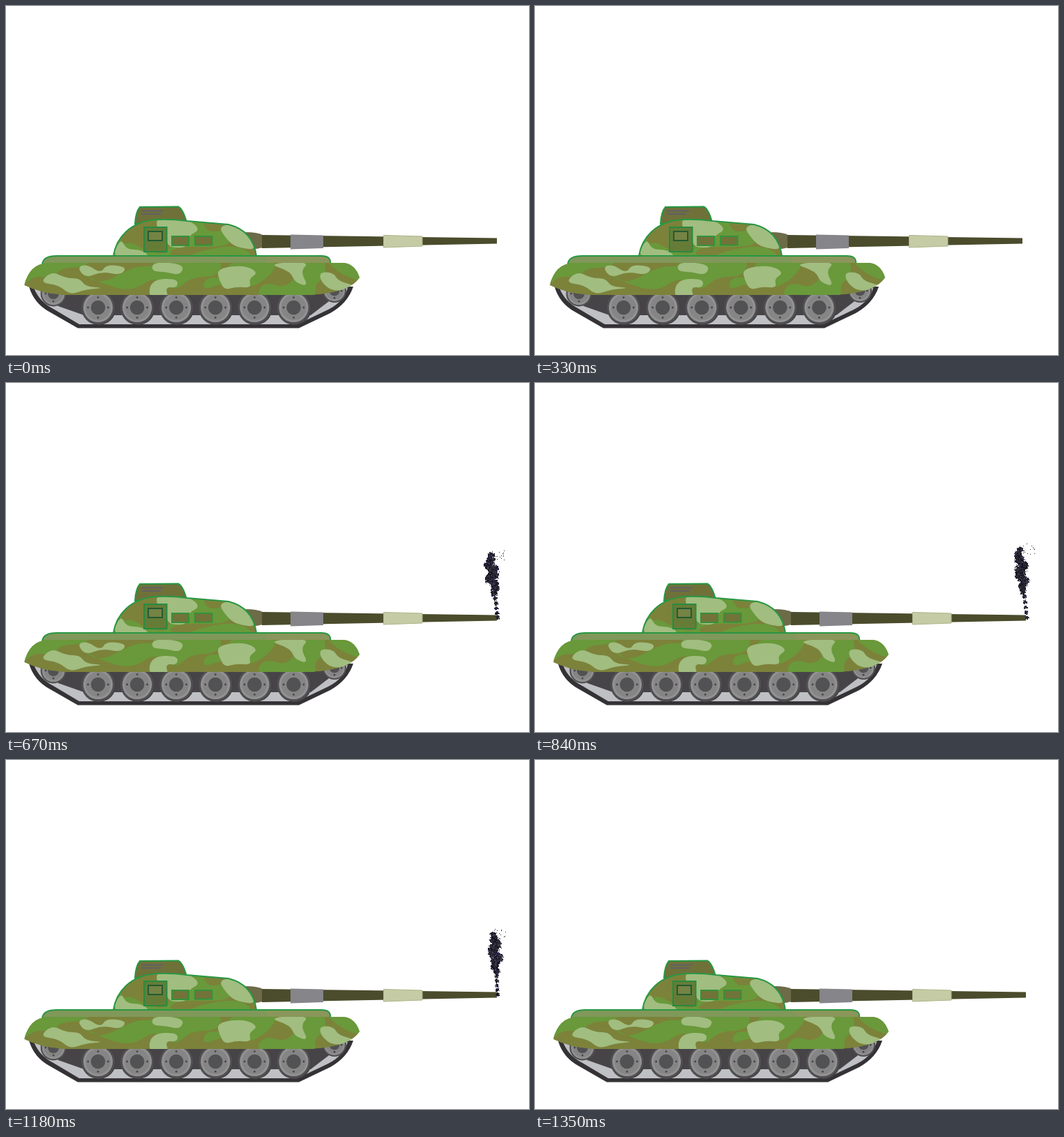
Animation, 750 px wide and 500 px high, one loop 1380 ms. Source, as an HTML page with a canvas:

```html
<!DOCTYPE html>
<html>
<head>
<meta charset="utf-8">
<style>
html, body { margin: 0; width: 100%; height: 100%; overflow: hidden; background: #fff; }
canvas { display: block; }
</style>
</head>
<body>
<canvas id="stage" width="750" height="500"></canvas>
<script>
const ctx = document.getElementById('stage').getContext('2d');
const OLIVE = '#7c823a', GREEN = '#69993a', LIGHT = '#a1bd80', EDGE = '#289743';
const LOOP = 1380, TURN = Math.PI * 2;

function shape(d, fill, stroke, width = 2) {
  const path = new Path2D(d);
  if (fill) { ctx.fillStyle = fill; ctx.fill(path); }
  if (stroke) { ctx.strokeStyle = stroke; ctx.lineWidth = width; ctx.stroke(path); }
}

function disc(x, y, r, fill) {
  ctx.fillStyle = fill;
  ctx.beginPath();
  ctx.arc(x, y, r, 0, TURN);
  ctx.fill();
}

function box(x, y, w, h, fill, stroke) {
  shape(`M${x} ${y}h${w}v${h}h${-w}z`, fill, stroke);
}

// Rounded closed patch steered by a few corner points
function patch(color, ...p) {
  const n = p.length;
  ctx.fillStyle = color;
  ctx.beginPath();
  for (let i = 0; i <= n; i += 2) {
    const x = p[i % n], y = p[(i + 1) % n];
    const mx = (x + p[(i + 2) % n]) / 2, my = (y + p[(i + 3) % n]) / 2;
    if (i) ctx.quadraticCurveTo(x, y, mx, my);
    else ctx.moveTo(mx, my);
  }
  ctx.fill();
}

function clipped(outline, base, paint) {
  ctx.save();
  ctx.clip(new Path2D(outline));
  shape(outline, base);
  paint();
  ctx.restore();
}

function wheel(x, y, r) {
  disc(x, y, r, '#514f51');
  disc(x, y, r * .88, '#929292');
  disc(x, y, r * .75, '#858586');
  disc(x, y, r * .43, '#525153');
  for (let i = 0; i < 4; i++) {
    const a = i * TURN / 4;
    disc(x + Math.cos(a) * r * .6, y + Math.sin(a) * r * .6, 1.4, '#444');
  }
}

function tracks() {
  shape('M33 402Q40 426 62 438L103 461.5H420L465 440Q490 426 498 402Z', '#353236');
  shape('M40 404Q48 424 68 434L105 456H418L462 435Q484 424 490 404Z', '#bec0c3');
  shape('M44 404L75 430L112 443H437L488 404Z', '#474448');
  wheel(68, 412, 18.5);
  wheel(471, 408, 17);
  for (let i = 0; i < 6; i++) {
    const x = 132 + i * 56.1;
    disc(x + 1, 432, 25, '#454246');
    wheel(x, 432, 24);
  }
}

function deck() {
  const outline = 'M52 370Q53 358 73 358H452Q467 358 465 370Z';
  clipped(outline, '#80985a', () => box(374, 359, 92, 11, '#8b965b'));
  shape(outline, null, EDGE);
}

function skirtPatches() {
  patch(GREEN, 20, 405, 40, 362, 125, 362, 112, 374, 76, 376, 70, 390, 40, 386);
  patch(GREEN, 106, 380, 135, 400, 185, 372, 212, 374, 212, 360, 312, 360, 304, 388, 265, 388, 242, 410, 215, 386, 180, 410, 135, 397);
  patch(GREEN, 322, 362, 390, 362, 382, 384, 350, 406, 312, 396, 282, 408, 286, 388, 315, 390);
  patch(GREEN, 356, 420, 370, 394, 405, 406, 430, 362, 458, 362, 458, 390, 442, 398, 446, 420);
  patch(GREEN, 455, 362, 500, 362, 515, 396, 482, 386);
  patch(LIGHT, 102, 374, 116, 370, 136, 383, 144, 370, 174, 374, 164, 386, 138, 380, 114, 390);
  patch(LIGHT, 48, 396, 66, 380, 86, 390, 106, 390, 114, 402, 142, 404, 114, 406, 92, 414, 76, 400);
  patch(LIGHT, 208, 380, 212, 366, 256, 370, 250, 386, 230, 381);
  patch(LIGHT, 204, 420, 208, 392, 246, 390, 246, 404, 228, 402, 234, 420);
  patch(LIGHT, 306, 394, 302, 376, 342, 371, 362, 382, 348, 391, 352, 404, 330, 402, 314, 407);
  patch(LIGHT, 374, 369, 436, 366, 422, 380, 434, 402, 414, 396, 408, 380);
  patch(LIGHT, 449, 381, 470, 382, 476, 394, 506, 402, 470, 410, 452, 396);
}

function hull() {
  deck();
  clipped('M26 400Q34 369 60 368H485Q501 370 507 389Q495 410 440 414H82Q50 412 26 400Z', OLIVE, skirtPatches);
}

function barrel() {
  shape('M344 324Q360 324 368 328V346Q358 349 346 348Z', '#6d6b48');
  shape('M367 328L704 332.5V340.5L367 347Z', '#4b4c2c');
  shape('M408 327.5L455 328.5V347L408 348.5Z', '#85858a');
  shape('M541.5 328.5L597 330V344L541.5 346Z', '#c5cba5', '#aeb488', 1);
}

function domePatches() {
  patch(OLIVE, 164, 342, 166, 318, 218, 298, 216, 320, 234, 324, 234, 358, 198, 350, 180, 338);
  patch(OLIVE, 280, 302, 330, 312, 310, 322, 288, 324);
  patch(OLIVE, 232, 362, 240, 344, 314, 346, 326, 332, 368, 352, 360, 362);
  patch(GREEN, 255, 362, 280, 350, 332, 342, 362, 362);
  patch(LIGHT, 216, 302, 258, 304, 280, 320, 260, 330, 262, 346, 230, 346, 232, 324, 216, 320);
  patch(LIGHT, 304, 315, 332, 312, 364, 350, 330, 346, 316, 334);
  patch(LIGHT, 150, 362, 165, 332, 172, 349, 196, 349, 208, 362);
}

function turret() {
  shape('M185 312Q186 295 192 288L247 287.5Q254 291 259 310Z', '#6f7139', EDGE);
  shape('M194 293.5H226M194 298H222', null, '#626066');
  const dome = 'M154 358C158 333 177 309 215 306Q238 305 260 308L319 313C343 319 356 335 359 358Z';
  clipped(dome, GREEN, domePatches);
  shape(dome, null, EDGE);
  box(198, 317, 32.5, 35, '#657c37', '#278b40');
  box(204, 323, 20, 13, '#758344', '#235b31');
  box(238, 330, 24, 13, '#717339', '#34913c');
  box(271, 330, 24.5, 12.5, '#717339', '#34913c');
}

function tank(shift) {
  ctx.save();
  ctx.translate(shift, 0);
  tracks();
  barrel();
  turret();
  hull();
  ctx.restore();
}

function random(seed) {
  return () => (seed = (seed * 16807) % 2147483647) / 2147483647;
}

function dot(x, y, size, color) {
  ctx.fillStyle = color;
  ctx.fillRect(Math.round(x), Math.round(y), size, size);
}

function puff(x, y, r, tones, rnd) {
  disc(x, y, r * .82, tones[1]);
  for (let i = 0; i < r * r * 1.5; i++) {
    const a = rnd() * TURN, d = Math.sqrt(rnd()) * r;
    dot(x + Math.cos(a) * d - 1, y + Math.sin(a) * d - 1, rnd() < .5 ? 1 : 2, tones[Math.floor(rnd() * 5)]);
  }
  for (let i = 0; i < r * 2; i++) {
    const a = rnd() * TURN, d = r * (.85 + rnd() * .35);
    dot(x + Math.cos(a) * d, y + Math.sin(a) * d, 1, rnd() < .3 ? '#30368b' : tones[0]);
  }
}

function fireSmoke(rnd) {
  const tones = ['#303036', '#45454d', '#5b5a61', '#28282e', '#3b3941'];
  puff(690, 240, 6, tones, rnd);
  puff(711, 242, 7, tones, rnd);
  for (let y = 230; y < 312; y += 8) {
    puff(700 + 9 * Math.cos(TURN * (y - 235) / 39), y, 6, tones, rnd);
  }
  shape('M705 228L703 221L708 224L712 219L712 230Z', tones[1]);
  shape('M697 319L701 308L704 315L709 309L708 324L706 341L701 332Z', '#74462f');
  shape('M699 321L703 313L707 323L706 335L701 330Z', '#d58b43');
  shape('M701 323L704 319L706 328L704 334Z', '#f6cf79');
}

// A swollen head that narrows into a thin stem at the muzzle
function darkSmoke(stage, rnd) {
  const tones = ['#15131d', '#292637', '#434050', '#302d31', '#171528'];
  const top = [247, 239, 253, 251][stage - 1];
  const lean = stage < 3 ? 8 : 2;
  for (let i = 0; i < 14; i++) {
    const u = i / 13, y = top + (336 - top) * u;
    const head = Math.max(0, Math.sin(Math.PI * Math.min(1, (u + .1) / .8)));
    const x = 702 - lean * (1 - u) + 3 * u + 4 * head * Math.sin(i * 2 + stage);
    puff(x, y, 2.5 + 5 * head, tones, rnd);
  }
  for (let i = 0; i < 18; i++) dot(693 + rnd() * 25, top - 9 + rnd() * 15, 1, '#28242b');
}

function draw(now) {
  const t = now % LOOP;
  ctx.fillStyle = '#fff';
  ctx.fillRect(0, 0, 750, 500);
  tank(t >= 330 && t < 500 ? -5 : 0);
  if (t >= 500 && t < 1350) {
    const stage = Math.floor((t - 500) / 170);
    const rnd = random(977 + stage * 1311);
    if (stage) darkSmoke(stage, rnd);
    else fireSmoke(rnd);
  }
  requestAnimationFrame(draw);
}
requestAnimationFrame(draw);
</script>
</body>
</html>
```
